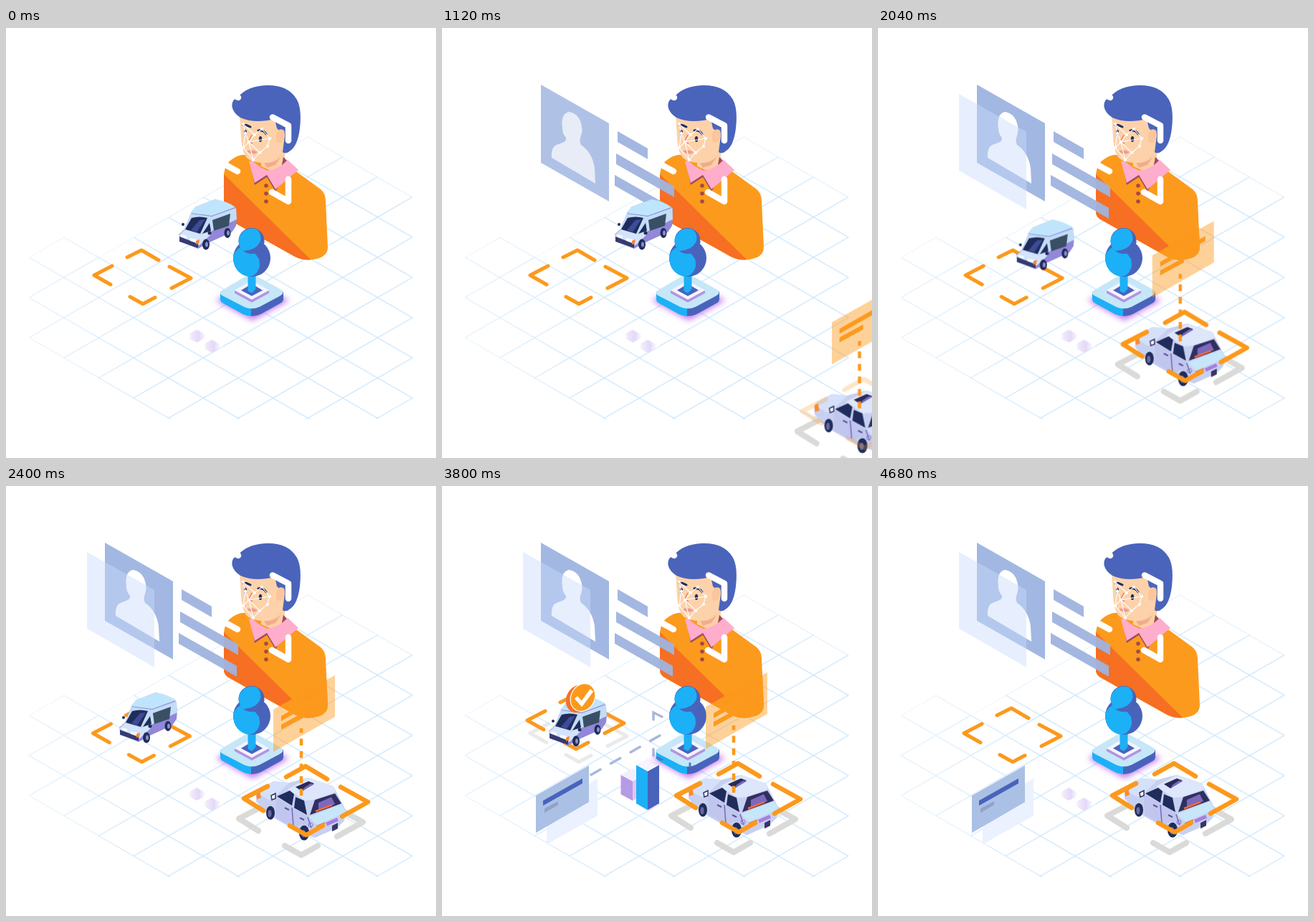
Recreate the animation shown at these times as an HTML page without scripts. Size 600x600 px, loop 4800 ms.

```html
<!DOCTYPE html>
<html lang="en">
<head>
<meta charset="utf-8">
<title>Isometric recognition scene</title>
<style>
  html, body { margin: 0; width: 100%; height: 100%; overflow: hidden; background: #fff; }
  svg { display: block; width: 100%; height: 100%; }

  .orange { fill: none; stroke: #fc991c; stroke-linecap: round; stroke-linejoin: round; }
  .shadow { fill: none; stroke: #dadad8; stroke-linecap: round; stroke-linejoin: round; }
  .wide { stroke-width: 6.5; }
  .slim { stroke-width: 5; }
  .dash { fill: none; stroke: #a9b8db; stroke-width: 3.5; stroke-linecap: round; }
  .cyan { fill: #1cb0f6; }
  .blue { fill: #4963bb; }
  .navy { fill: #202c5b; }
  .amber { fill: #fc9a1d; }

  /* One shared 4.8 s clock */
  .t { animation: 4.8s linear infinite both; }

  .frame { animation-name: frame; transform-origin: 347px 163px; }
  @keyframes frame { 0%, 1.6% { transform: none; } 7% { transform: scale(.93); } 12.5%, 100% { transform: none; } }

  .plate { animation-name: plate; }
  @keyframes plate { 0%, 13.4% { opacity: 0; } 25%, 100% { opacity: 1; } }
  .lines { animation-name: lines; }
  @keyframes lines { 0%, 15% { opacity: 0; } 22.5%, 100% { opacity: .95; } }
  .person { animation-name: person; }
  @keyframes person { 0%, 15% { opacity: 0; } 23.3% { opacity: .7; } 31%, 100% { opacity: 1; } }
  .glass { animation-name: glass; }
  @keyframes glass { 0%, 25% { opacity: 0; transform: translate(25px, -13px); } 34%, 100% { opacity: 1; transform: none; } }

  .car { animation-name: car; }
  @keyframes car {
    0%, 18% { transform: translate(310px, 180px); }
    23.33% { transform: translate(176px, 103px); }
    27% { transform: translate(105px, 62px); }
    31% { transform: translate(60px, 35px); }
    35% { transform: translate(32px, 20px); }
    40% { transform: translate(18px, 11px); }
    50% { transform: translate(5px, 4px); }
    60%, 100% { transform: none; }
  }
  .blink { animation-name: blink; }
  @keyframes blink { 0%, 20% { opacity: .1; } 23.33% { opacity: .25; } 31%, 60% { opacity: 1; } 64.5%, 66.5% { opacity: .13; } 72%, 100% { opacity: 1; } }
  .tag { animation-name: tag; }
  @keyframes tag { 0%, 93% { opacity: 1; } 97%, 100% { opacity: 0; } }

  .van { animation-name: van; }
  @keyframes van {
    0%, 30% { transform: none; animation-timing-function: ease-in; }
    35% { transform: translate(-8px, 5px); }
    47.5% { transform: translate(-75px, 44px); }
    50% { transform: translate(-83px, 49px); animation-timing-function: ease-out; }
    57% { transform: translate(-90px, 53px); }
    79.2%, 83% { transform: translate(-92px, 54px); animation-timing-function: ease-in; }
    97%, 100% { transform: translate(-335px, 194px); }
  }
  .hover { animation-name: hover; }
  @keyframes hover {
    0%, 34% { transform: none; }
    54% { transform: translate(-2px, 0); animation-timing-function: ease-in-out; }
    63%, 88% { transform: translate(-4px, -18px); animation-timing-function: ease-in-out; }
    97%, 100% { transform: translate(-3px, 0); }
  }
  .ground { animation-name: ground; }
  @keyframes ground { 0%, 54% { opacity: 0; } 63%, 88% { opacity: .55; } 97%, 100% { opacity: 0; } }
  .badge { animation-name: badge; transform-origin: 193px 312px; }
  @keyframes badge { 0%, 60% { opacity: 0; transform: scale(.2); } 65%, 84% { opacity: 1; transform: none; } 90%, 100% { opacity: 0; transform: scale(.2); } }

  .note { animation-name: note; }
  @keyframes note { 0%, 60% { opacity: 0; } 65%, 100% { opacity: 1; } }
  .link { animation-name: link; }
  @keyframes link { 0%, 60% { opacity: 0; } 65%, 91% { opacity: 1; } 97%, 100% { opacity: 0; } }
  .tall { animation-name: tall; }
  @keyframes tall { 0%, 60% { transform: translateY(54px); } 65.8% { transform: translateY(6px); } 70%, 88% { transform: none; } 96.5%, 100% { transform: translateY(54px); } }
  .short { animation-name: short; }
  @keyframes short { 0%, 60% { transform: translateY(27px); } 65%, 88% { transform: none; } 96.5%, 100% { transform: translateY(27px); } }
  .solid { animation-name: solid; }
  @keyframes solid { 0%, 60% { opacity: 0; } 61%, 95.5% { opacity: 1; } 96.5%, 100% { opacity: 0; } }
</style>
</head>
<body>
<svg viewBox="0 0 600 600">
  <defs>
    <linearGradient id="gridFade" gradientUnits="userSpaceOnUse" x1="32" y1="0" x2="600" y2="0">
      <stop offset="0" stop-color="#fff" stop-opacity=".5"/>
      <stop offset=".35" stop-color="#fff" stop-opacity="0"/>
    </linearGradient>
    <linearGradient id="topFade" gradientUnits="userSpaceOnUse" x1="0" y1="150" x2="0" y2="240">
      <stop offset="0" stop-color="#fff" stop-opacity=".4"/>
      <stop offset="1" stop-color="#fff" stop-opacity="0"/>
    </linearGradient>
    <linearGradient id="barTop">
      <stop offset=".15" stop-color="#fff"/>
      <stop offset=".3" stop-color="#efe8fb"/>
      <stop offset=".6" stop-color="#e4d8f8"/>
      <stop offset=".9" stop-color="#fff"/>
    </linearGradient>
    <pattern id="tile" patternUnits="userSpaceOnUse" x="32" y="320" width="97.3" height="56.1">
      <path d="M-5,-2.9 L102.3,59 M-5,59 L102.3,-2.9 M92.3,-2.9 l10,5.8 M-5,53.2 l10,5.8 M-5,2.9 l10,-5.8 M92.3,59 l10,-5.8" fill="none" stroke="#c9e5fc" stroke-width="1.2"/>
    </pattern>
    <filter id="soft" x="-30%" y="-50%" width="160%" height="200%"><feGaussianBlur stdDeviation="4"/></filter>
    <marker id="dot" viewBox="0 0 4 4" refX="2" refY="2" markerWidth="3.6" markerHeight="3.6"><circle cx="2" cy="2" r="2" fill="#fff"/></marker>
    <path id="torso" d="M304,257 V204 Q306,188 317,182 Q325,177 332,177 L388,186 L406,201 L439,225 Q446,231 446,241 L449,306 Q449,317 437,321 Q419,327 403,319 L312,268 Q304,264 304,257Z"/>
    <clipPath id="inTorso"><use href="#torso"/></clipPath>
    <clipPath id="tallClip"><path d="M271,300 H303 V443 L287,452 L271,443Z"/></clipPath>
    <clipPath id="shortClip"><path d="M249,300 H283 V430 L266,439 L249,430Z"/></clipPath>
    <path id="diamond" d="M-16.5,0 L0,-9 L16.5,0 L0,9Z"/>
    <path id="carCorners" d="M360,415 L327,432 L354,449 M386,402 L413,387 L443,405 M462,416 L500,437 L464,457 M391,470 L414,483 L437,470"/>
    <path id="vanCorners" d="M148,332 L123,345 L146,358 M169,320 L189,310 L213,324 M228,333 L258,349 L231,363 M173,375 L191,385 L208,376"/>
    <path id="tagPlate" d="M368,308 L454,260 V318 L368,367Z"/>
  </defs>

  <!-- Floor -->
  <path d="M32,320 L81,291.5 L130,320 L421,151.5 L567.5,236 V517 L518.5,545.5 H227 L32,432.5Z" fill="url(#tile)"/>
  <rect y="140" width="600" height="420" fill="url(#gridFade)"/>
  <rect y="140" width="600" height="100" fill="url(#topFade)"/>

  <!-- Man -->
  <use href="#torso" class="amber"/>
  <g clip-path="url(#inTorso)">
    <path d="M300,200 L428,326 H300Z" fill="#f66f22"/>
    <g class="t car"><use href="#tagPlate" class="amber t tag"/></g>
  </g>
  <path d="M356,175 L389,158 V190 L372,200 L356,193Z" fill="#fccfa6"/>
  <path d="M360,188 Q372,190 383,180 L376,191 L364,195Z" fill="#f3ab8d"/>
  <path d="M387,180 L394,187 L384,196Z" fill="#a04c5c"/>
  <path d="M341,189 L347,219 L364,208 L376,228 L379,223 L364,203 L347,212Z" fill="#a04c5c"/>
  <path d="M339,186 L344,185 Q352,194 365,199 Q381,197 393,184 L408,198 L376,225 L364,205 L347,216Z" fill="#ffadcc"/>
  <g fill="#a34a42"><circle cx="363" cy="220" r="2.8"/><circle cx="363" cy="231" r="2.8"/><circle cx="363" cy="242" r="2.8"/></g>
  <path d="M326,120 L328,153 Q329,174 337,182 Q346,189 364,188 Q380,184 388,167 L395,130 L360,112Z" fill="#fdd2aa"/>
  <path d="M316,112 Q313,101 324,96 Q337,81 363,80 Q394,79 406,100 Q413,113 410,140 Q407,164 397,171 Q390,177 386,173 L389,150 L378,140 L375,127 Q346,134 327,125 Q318,119 316,112Z" fill="#4a64bc"/>
  <path d="M377,148 Q381,138 388,143 Q391,151 385,159 Q380,162 377,158Z" fill="#fbc69b"/>
  <g fill="none" stroke="#202c5b" stroke-width="3" stroke-linecap="round"><path d="M331,135 q5,0 10,3 M352,143 q7,-1 11,5"/></g>
  <g class="navy"><ellipse cx="334" cy="146" rx="2" ry="4"/><ellipse cx="355" cy="155" rx="2.2" ry="4"/></g>
  <path d="M343,149 L338,159 L344,161" fill="none" stroke="#ee7669" stroke-width="1.4"/>
  <path d="M336,172 Q342,168 351,173 Q345,179 336,172Z" fill="#ee9b91"/>
  <path d="M331,134 L347,149 L357,141 L368,154 L365,165 L354,174 L345,184 L331,167 L334,147 L331,134 M347,149 L339,159 L354,174 M331,167 L339,159 L368,154 M334,147 L339,159 L345,184"
        fill="none" stroke="#fff" stroke-width="1.1" marker-mid="url(#dot)"/>
  <path class="t frame" d="M299,108 V84 L324,97 M372,124.500 L394,136 V157 M394,211 V242 L371,229 M299,164 V187 L323,200" fill="none" stroke="#fff" stroke-width="8.500" stroke-linecap="round" stroke-linejoin="round"/>

  <!-- Identity card -->
  <path class="t plate" d="M138,79 L233,133 V242 L138,188Z" fill="#a2b8e2"/>
  <path class="t person" d="M153,181 Q152,166 160,163 L168,160 Q174,158 173,153 Q168,148 168,140 Q165,120 177,117 Q190,119 194,133 Q197,142 194,150 Q191,158 194,163 Q210,174 213,196 L214,217Z" fill="#fff"/>
  <path class="t glass" d="M113,92 L207,145 V253 L113,199Z" fill="#cbdcfd" fill-opacity=".46"/>
  <g class="t lines" fill="#a0b4df">
    <path d="M245,144 l42,24 v15 l-42,-24Z"/>
    <path d="M243,175 l81,46 v15 l-81,-46Z"/>
    <path d="M241,205 l81,46 v15 l-81,-46Z"/>
  </g>

  <!-- Landing spot and van -->
  <use href="#vanCorners" class="shadow slim t ground"/>
  <use href="#vanCorners" class="orange slim t hover"/>
  <g class="t van">
    <path d="M241,288 L249,281 L258,259 L264,250 L292,239 L319,249 Q323,262 321,276 L315,285 L284,299 L268,308 L243,298Z" fill="#9287d8"/>
    <path d="M258,259 L287,263 L321,251 L322,267 L286,284 L272,290 L249,281Z" fill="#c3dcf7"/>
    <path d="M241,289 L250,281 L273,289 L284,281 L285,289 L270,303 L243,296Z" fill="#d3e3fa"/>
    <path d="M257,258 L264,250 L292,239 Q310,242 320,250 L287,262Z" fill="#bfe5fd"/>
    <path d="M250,281 L259,265 Q270,262 281,265 L271,287Z" class="navy"/>
    <path d="M258,282 L270,268 L278,267 L266,285Z" fill="#3d4c98"/>
    <path d="M274,287 L284,272 L286,283Z" class="navy"/>
    <path d="M288,268 L313,259 L311,276 L290,283Z" fill="#384f65"/>
    <path d="M242,291 L268,301 V307 L242,298Z" fill="#343b72"/>
    <path d="M245,288 l7,2 v4 l-8,-3Z M257,293 l9,2 v5 l-9,-3Z" fill="#f5faff"/>
    <path d="M265,297 l5,-2 l-1,6 l-4,1Z" fill="#f9842c"/>
    <g class="navy"><ellipse cx="279" cy="302" rx="5" ry="7.500"/><ellipse cx="309" cy="286" rx="4.500" ry="7"/><circle cx="247" cy="274" r="2"/><circle cx="284" cy="286" r="2.500"/></g>
    <g fill="#8790c4"><ellipse cx="280" cy="302" rx="2" ry="3.500"/><ellipse cx="310" cy="286" rx="2" ry="3.500"/></g>
  </g>
  <g class="t badge">
    <ellipse cx="190" cy="297" rx="16.500" ry="20" transform="rotate(28 190 297)" fill="#f27427"/>
    <ellipse cx="196.500" cy="295" rx="16.500" ry="20" transform="rotate(28 196.500 295)" fill="#fc991c" stroke="#fff" stroke-width="1.200"/>
    <path d="M187,295 L195,304 L209,285" fill="none" stroke="#fff" stroke-width="5.500"/>
  </g>

  <!-- Note card -->
  <g class="t note">
    <path d="M146,451 L217,408 V460 L146,500Z" fill="#ebf1fe"/>
    <path d="M131,432 L205,390 V441 L131,484Z" fill="#abc0e5"/>
    <path d="M141,439 L196,408 V415 L141,446Z" class="blue"/>
    <path d="M143,450 l19,-10 v5 l-19,11Z" fill="#91a1c9"/>
  </g>
  <g class="t link">
    <path class="dash" d="M208,403 L305,347.500" stroke-dasharray="15 16.800"/>
    <path class="dash" d="M295,326 V316 L307,322 M295,367 V376"/>
  </g>

  <!-- Bars -->
  <use href="#diamond" x="266" y="430" fill="url(#barTop)"/>
  <use href="#diamond" x="287" y="444" fill="url(#barTop)"/>
  <g clip-path="url(#shortClip)"><g class="t solid"><g class="t short">
    <path d="M249.500,403 L266,412 V470 H249.500Z" fill="#b79ae5"/>
    <path d="M266,412 L282.500,403 V470 H266Z" fill="#e6c3ee"/>
    <use href="#diamond" x="266" y="403" fill="#f3eefd"/>
  </g></g></g>
  <g clip-path="url(#tallClip)"><g class="t solid"><g class="t tall">
    <path d="M271,389 L287,398 V510 H271Z" class="cyan"/>
    <path d="M287,398 L303,389 V510 H287Z" class="blue"/>
    <use href="#diamond" x="287" y="389" fill="#f7f4fe"/>
  </g></g></g>

  <!-- Sensor -->
  <path d="M293,380 L343,354 L395,380 L344,408Z" fill="#b04fe8" opacity=".75" filter="url(#soft)"/>
  <path d="M299,368 L342,360 V402 Q336,402 330,399 L303,384 Q299,382 299,378Z" class="cyan"/>
  <path d="M342,360 L387,368 V378 Q387,382 383,384 L356,399 Q350,402 342,402Z" class="blue"/>
  <path d="M303,365 L332,348 Q342,343 353,348 L382,364 Q391,369 382,374 L354,389 Q343,394 332,389 L303,374 Q295,370 303,365Z" fill="#c5e7f8"/>
  <path d="M319,367 L343,353 L367,367 V370 L343,383 L319,370Z" fill="#b393e0"/>
  <path d="M319,366 L343,352 L367,366 L343,379Z" fill="#f4f4ff"/>
  <path d="M328,366 L343,357 L358,366 L343,374Z" class="blue"/>
  <path d="M337.500,340 H348.500 V364 L343,370 L337.500,367Z" class="cyan"/>
  <ellipse cx="343" cy="321" rx="26" ry="26" class="blue"/>
  <path d="M333,303 Q318,309 317,321 Q318,342 338,347 Q351,346 354,332 Q355,320 346,314Z" class="cyan"/>
  <circle cx="342.500" cy="297" r="18" class="blue"/>
  <path d="M350,281 Q357,287 355,297 Q350,310 331,311 Q323,304 325,293 Q333,276 350,281Z" class="cyan"/>
  <path class="t link" d="M300,379 l7,3 M346,387 v4" fill="none" stroke="#4d79bd" stroke-width="3" stroke-linecap="round"/>

  <!-- Car -->
  <g class="t car">
    <use href="#carCorners" class="shadow" stroke-width="8" transform="translate(-7 28)"/>
    <path d="M344,424 L347,420 L368,408 L390,410 L417,403 L452,415 L457,425 L470,450 L467,463 L457,473 L426,487 L402,478 L372,461 L356,450 L344,436Z" fill="#c8d0f1"/>
    <g class="navy"><ellipse cx="364" cy="452" rx="6" ry="9.500"/><ellipse cx="411" cy="480" rx="7" ry="10.500"/></g>
    <path d="M344,424 L347,420 L368,408 L390,410 L371,429 L362,434Z" fill="#d5e1fa"/>
    <path d="M371,430 L395,444 L417,458 L421,474 Q407,462 400,474 L372,459Z" fill="#c0c6ed"/>
    <path d="M388,419 L417,403 L452,415 L455,423 L424,434 L412,435Z" fill="#dde6fb"/>
    <path d="M399,416 L417,408 L425,411 L408,422Z" fill="#2a2a58"/>
    <path d="M411,417 L420,411 L425,412 L408,422Z" fill="#7769bd"/>
    <path d="M373,429 L391,421 L397,426 L394,442Z M399,430 L411,435 L415,455 L397,445Z" class="navy"/>
    <path d="M419,455 L426,434 L454,425 L463,439Z" fill="#30305f"/>
    <path d="M431,438 L449,430 L454,440 L431,449Z" fill="#7c69be"/>
    <path d="M427,450 L450,441" stroke="#f06b35" stroke-width="2.500"/>
    <path d="M417,458 L463,440 L470,451 L429,469Z" fill="#c7e6fa"/>
    <path d="M394,445 L396,470 M416,458 L421,473" stroke="#7568b9" stroke-width="1.500"/>
    <path d="M428,470 l12,-5 l-2,8 l-8,3Z M462,455 l8,-5 l-3,8 l-5,2Z" fill="#f46a35"/>
    <path d="M442,468 L458,461" stroke="#a87ee2" stroke-width="5"/>
    <path d="M450,470 l8,-4 v8 l-8,4Z" fill="#353767"/>
    <path d="M344,424 l5,-3 l2,10 l-6,2Z" fill="#fa8a35"/>
    <path d="M365,428 l6,-3 v7 l-5,2Z" fill="#fff" stroke="#30305f" stroke-width="1.500"/>
    <path d="M384,445 l6,3 M405,459 l6,3" stroke="#5d559c" stroke-width="2"/>
    <circle cx="420" cy="469" r="3" fill="none" stroke="#8671ce"/>
    <g fill="#656aa0"><ellipse cx="363" cy="453" rx="2.500" ry="5"/><ellipse cx="410" cy="481" rx="3" ry="5"/></g>
    <use href="#carCorners" class="orange wide t blink"/>
    <g class="t tag">
      <path d="M407,334 V430" stroke="#fc991c" stroke-width="4.500" stroke-dasharray="9.500 8" stroke-dashoffset="3"/>
      <use href="#tagPlate" class="amber" fill-opacity=".45"/>
      <path d="M379,317 L442,281 V288 L379,324Z M379,329 L412,311 V318 L379,336Z" class="amber"/>
    </g>
  </g>
</svg>
</body>
</html>
```
